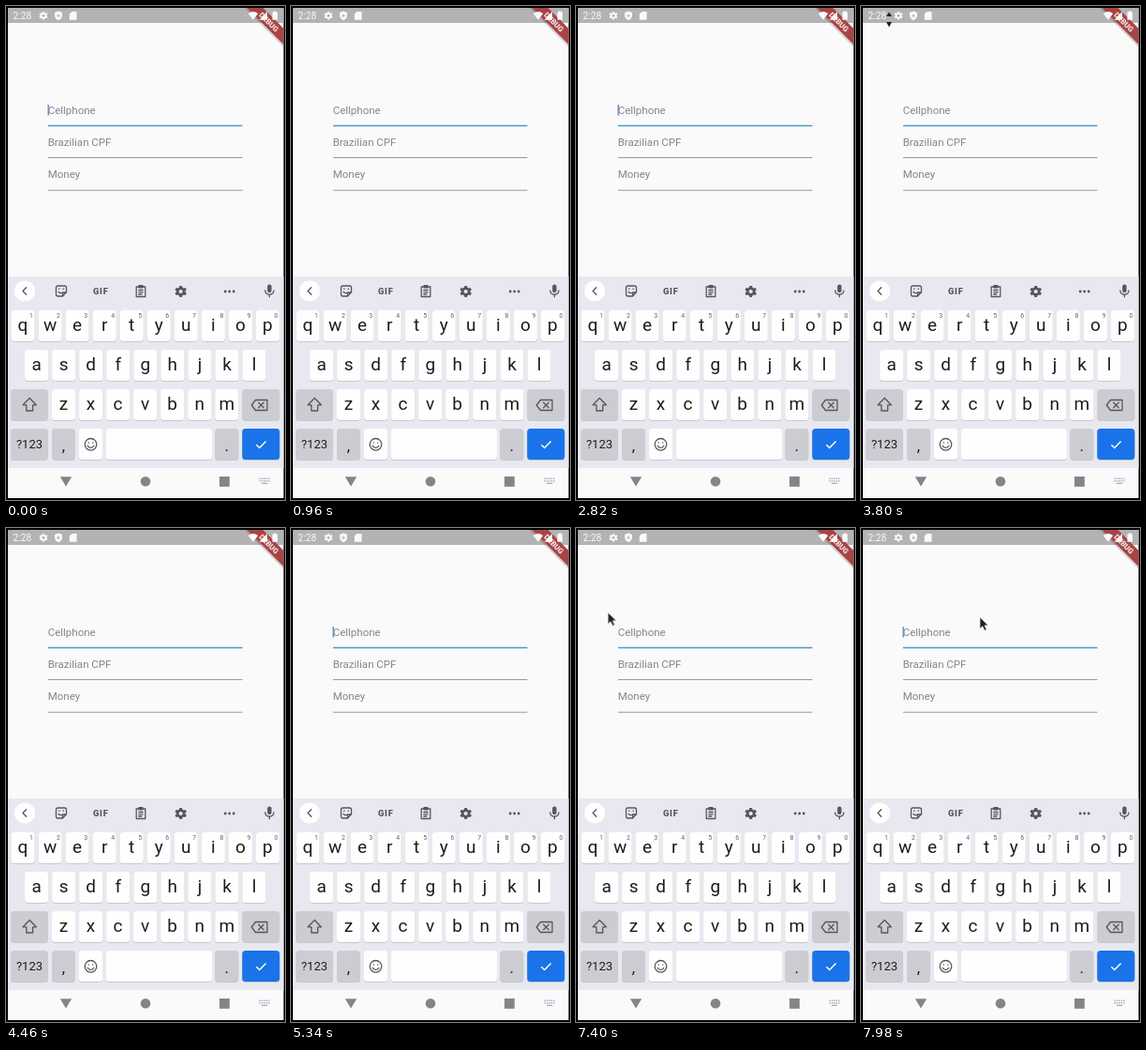
An HTML page for the animation above (8 s loop, 298 by 526 pixels).

```html
<!DOCTYPE html>
<html lang="en">
<head>
<meta charset="utf-8">
<title>Masked text fields</title>
<style>
  html, body { margin: 0; width: 100%; height: 100%; overflow: hidden; background: #000; }
  svg { display: block; width: 100%; height: 100%; font-family: Roboto, sans-serif; }
  .label { font-size: 11.5px; fill: #85858a; }
  .key { fill: #fefefe; }
  .key.dim { fill: #cccdd2; }
  .letter { font-size: 19px; fill: #1c1c1e; text-anchor: middle; }
  .hint { font-size: 7px; fill: #66666c; text-anchor: middle; }
  .line { fill: none; stroke: #55565c; stroke-width: 1.3; stroke-linecap: round; stroke-linejoin: round; }
  .solid { fill: #55565c; }
  .nav { fill: #858588; }
  .status { fill: #fafafa; }

  #caret { animation: blink 8s step-end infinite; }
  #pointer { visibility: hidden; animation: show-pointer 8s step-end infinite, move 8s linear infinite; }
  #resize { visibility: hidden; animation: show-resize 8s step-end infinite; }

  @keyframes blink {
    0%, 27.625%, 60.875%, 94.125% { visibility: visible; }
    11%, 44.25%, 77.5% { visibility: hidden; }
  }
  @keyframes show-pointer {
    0% { visibility: hidden; }
    91.25%, 100% { visibility: visible; }
  }
  @keyframes move {
    0%, 91.25% { transform: translate(1px, 92px); }
    92.5% { transform: translate(34px, 90px); }
    95.5% { transform: translate(72px, 82px); }
    99.7%, 100% { transform: translate(127px, 95px); }
  }
  @keyframes show-resize {
    0% { visibility: hidden; }
    47% { visibility: visible; }
    48.75%, 100% { visibility: hidden; }
  }
</style>
</head>
<body>
<svg viewBox="0 0 298 526" preserveAspectRatio="none">
  <defs>
    <clipPath id="screen"><path d="M2 2H296.5V524H2z"/></clipPath>
    <path id="gear" d="M-1.3-6H1.3L1.8-4.2 3.2-3.5 5-4.1 6.2-1.8 4.7-.6V.6L6.2 1.8 5 4.1 3.2 3.5 1.8 4.2 1.3 6H-1.3L-1.8 4.2-3.2 3.5-5 4.1-6.2 1.8-4.7.6V-.6L-6.2-1.8-5-4.1-3.2-3.5-1.8-4.2zM0-2.1A2.1 2.1 0 1 0 0 2.1 2.1 2.1 0 1 0 0-2.1z" fill-rule="evenodd"/>
  </defs>

  <rect width="298" height="526"/>
  <g clip-path="url(#screen)">
    <rect width="298" height="526" fill="#fafafa"/>
    <rect width="298" height="18" fill="#b3b3b5"/>

    <!-- debug banner -->
    <g transform="translate(281 17) rotate(45)">
      <rect x="-40" y="-5" width="80" height="13" fill="#555" opacity=".25"/>
      <rect x="-40" y="-6" width="80" height="12" fill="#a94444"/>
      <text y="3" text-anchor="middle" font-size="8" font-weight="900" fill="#f3e4e4">DEBUG</text>
    </g>

    <!-- status bar -->
    <g class="status">
      <text x="7.5" y="14.3" font-size="10.2">2:28</text>
      <use href="#gear" transform="translate(40 10.2) scale(.72)"/>
      <path d="M56 5.5L60 7V10Q60 13.4 56 15.2 52 13.4 52 10V7z"/>
      <path d="M70.5 6H75.5V14.8H67.8V8.6z"/>
      <path d="M258.8 8Q264 3.8 269.2 8L264 14.8z"/>
      <path d="M279 6V14.8H270.5z"/>
      <path d="M286 5.5H288.5V6.5H290V14.8H284.5V6.5H286z"/>
    </g>
    <path d="M54.2 10.3H57.8M56 8.5V12.1" stroke="#b3b3b5"/>

    <!-- form -->
    <g class="label">
      <text x="44.7" y="114.8">Cellphone</text>
      <text x="44.7" y="148.8">Brazilian CPF</text>
      <text x="44.7" y="183">Money</text>
    </g>
    <path d="M45 127.4H252.5" stroke="#4a9acb" stroke-width="1.5"/>
    <path d="M45 161.5H252.5M45 196.2H252.5" stroke="#99999c"/>
    <rect id="caret" x="44.5" y="105" width="1.4" height="11.5" fill="#6388c0"/>

    <!-- keyboard -->
    <rect y="288" width="298" height="204" fill="#e8e9f0"/>
    <circle cx="20" cy="303.5" r="11" fill="#fefefe"/>
    <path class="line" d="M21.6 299.8L18 303.5 21.6 307.2"/>
    <path class="line" d="M55.5 298H62.5Q64.5 298 64.5 300V304.5L60.5 309H55.5Q53.5 309 53.5 307V300Q53.5 298 55.5 298zM60.5 309V305H64.5M56.5 301.2H57M61 301.2H61.5M56 304.3Q57.5 306.2 59.5 305.5"/>
    <text class="solid" x="101.3" y="306.8" text-anchor="middle" font-size="9.3" font-weight="900" letter-spacing=".8">GIF</text>
    <path class="line" d="M139.2 299H148.8V309.5H139.2zM141.8 302.5H146.2M141.8 304.8H146.2M141.8 307H144.8"/>
    <rect class="solid" x="141.3" y="297" width="5.4" height="3.6" rx="1"/>
    <use href="#gear" class="solid" x="186.7" y="304"/>
    <g class="solid">
      <circle cx="234.2" cy="304" r="1.4"/><circle cx="238.7" cy="304" r="1.4"/><circle cx="243.2" cy="304" r="1.4"/>
      <rect x="279.2" y="296.5" width="4.4" height="8.6" rx="2.2"/>
    </g>
    <path class="line" d="M276.8 303Q277 307.2 281.4 307.2 285.8 307.2 286 303M281.4 307.5V309.8"/>
    <g id="keys"></g>

    <path class="line" d="M25.2 417.5L32.3 424.8H28.6V431H21.8V424.8H18.1z"/>
    <path class="line" d="M266.5 419.5H279V430.5H266.5L262.3 425zM269.7 422.3L275.2 427.8M275.2 422.3L269.7 427.8"/>
    <circle class="line" cx="90.5" cy="466.8" r="6.3"/>
    <path class="line" d="M88.2 465H88.3M92.7 465H92.8M87.2 468.3Q90.5 472.5 93.8 468.3"/>
    <path d="M267.4 467.2L270.8 470.5 277.6 463.5" fill="none" stroke="#fefefe" stroke-width="1.5"/>

    <!-- navigation bar -->
    <g class="nav">
      <path d="M57.8 501.2H70.2L64 511.5z"/>
      <circle cx="149" cy="506.3" r="5.3"/>
      <rect x="228" y="501" width="10.8" height="10.8"/>
    </g>
    <path d="M270.5 503.3H281.8M270.5 505.8H281.8" stroke="#a9a9c0" stroke-width="1.4" stroke-dasharray="1.4 1"/>
    <path d="M273 508.4H279.3" stroke="#a9a9c0" stroke-width="1.2"/>
  </g>

  <g id="resize" fill="#222">
    <path d="M30 6.5L33 11H27zM30 22.5L27 17H33z"/>
  </g>
  <path id="pointer" d="M0 0V12.3L2.9 9.7 5 14.3 7.2 13.3 5.1 8.8H9z" fill="#222" stroke="#eee" stroke-width=".7"/>
</svg>
<script>
  const keys = document.getElementById('keys');
  const parts = [];

  function addKey(x, y, width, kind = '', color = '') {
    const fill = color ? ` style="fill:${color}"` : '';
    parts.push(`<rect x="${x}" y="${y + 1}" width="${width}" height="33" rx="3.5" fill="#c8c9ce"/>`,
      `<rect class="key ${kind}" x="${x}" y="${y}" width="${width}" height="33" rx="3.5"${fill}/>`);
  }

  function addText(text, x, y, kind = 'letter', size = '') {
    const style = size ? ` style="font-size:${size}px"` : '';
    parts.push(`<text class="${kind}" x="${x}" y="${y}"${style}>${text}</text>`);
  }

  function addRow(letters, firstX, y, hints = '') {
    [...letters].forEach((letter, i) => {
      const x = firstX + i * 29.05;
      addKey(x - 12.5, y, 25);
      addText(letter, x, y + 22.4);
      if (hints) addText(hints[i], x + 9, y + 8, 'hint');
    });
  }

  addRow('qwertyuiop', 18, 324, '1234567890');
  addRow('asdfghjkl', 32.6, 366);
  addRow('zxcvbnm', 61.5, 408);
  addKey(5, 408, 40, 'dim');
  addKey(252.3, 408, 40, 'dim');

  addKey(5, 450, 40, 'dim');
  addText('?123', 25, 471.3, 'letter', 13);
  addKey(49, 450, 25, 'dim');
  addText(',', 61.5, 474, 'letter', 17);
  addKey(78, 450, 25);
  addKey(107, 450, 113);
  addKey(223.3, 450, 25, 'dim');
  addText('.', 235.8, 474, 'letter', 17);
  addKey(252.3, 450, 40, '', '#1a73e8');

  keys.innerHTML = parts.join('');
</script>
</body>
</html>
```
